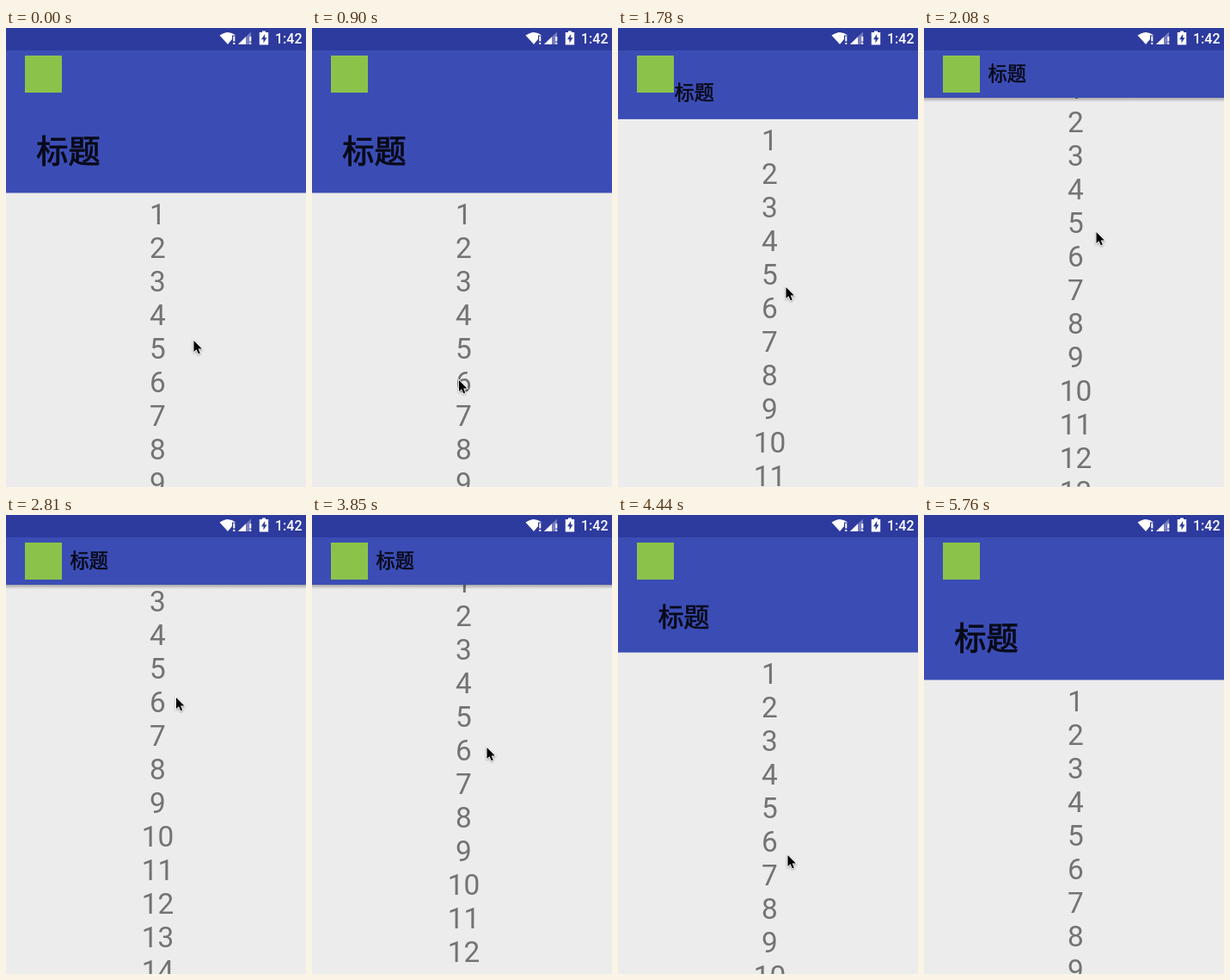
Write an HTML page that moves like this. It is 349x533 px and loops after 6.06 s.

```html
<!DOCTYPE html>
<html lang="zh">
<head>
<meta charset="utf-8">
<style>
  html, body { margin: 0; width: 100%; height: 100%; overflow: hidden; background: #ececec; }
  svg { display: block; }
  #list { font: 33.4px Roboto, sans-serif; fill: #737373; text-anchor: middle; }
  #title {
    font-family: "Noto Sans CJK SC", "Noto Sans CJK", sans-serif;
    fill: #080a18; stroke: #080a18; stroke-width: .025em;
  }
  #clock { font: 500 16px Roboto, sans-serif; fill: #fff; }
  #cursor { filter: drop-shadow(0 1px 1px rgba(0, 0, 0, .35)); }
</style>
</head>
<body>
<svg width="349" height="533" viewBox="0 0 349 533">
  <defs>
    <linearGradient id="fade" x2="0" y2="1">
      <stop offset="0" stop-color="#000" stop-opacity=".3"/>
      <stop offset="1" stop-color="#000" stop-opacity="0"/>
    </linearGradient>
  </defs>
  <rect width="349" height="533" fill="#ececec"/>
  <g id="list"></g>
  <rect id="shadow" y="81" width="349" height="5" fill="url(#fade)"/>
  <rect id="header" width="349" fill="#3b4db5"/>
  <rect width="349" height="26" fill="#2d3a9e"/>
  <rect x="22" y="32" width="43" height="43" fill="#8bc34a"/>

  <!-- status bar: wifi, signal, battery, clock -->
  <g fill="#fff">
    <path d="M248.5 8.5Q258 1.5 267.5 8.5H263V13L258 19Z"/>
    <path d="M264.3 9.5h2v6h-2zM264.3 17h2v2h-2z"/>
    <path d="M285 4.5V19H270Z" opacity=".35"/>
    <path d="M279 10.3V19H270Z"/>
    <path d="M283.3 10h2v5.5h-2zM283.3 17h2v2h-2z"/>
    <path d="M298 3.5h4V5h3.2v14.5h-10.4V5H298Z"/>
    <path d="M301.2 7l-4.2 6.2h2.5V17.5l4-6.3h-2.3Z" fill="#2d3a9e"/>
  </g>
  <text id="clock" x="313" y="18">1:42</text>

  <text id="title">标题</text>
  <path id="cursor" d="M0 0V13L3 10.2L5.2 15.3L7.3 14.4L5.2 9.5H9.4Z"
        stroke="#fff" stroke-width="1.6" paint-order="stroke"/>
</svg>
<script>
const LOOP = 6060, TICK = 147.7;  // the picture advances once per tick
const RANGE = 111;                // scroll needed to collapse the header

// Key points: [tick, value...], straight lines between them
const scrollKeys = [[8.9, 0], [10, 26], [14, 146], [15.6, 194], [23.9, 194], [30, 32], [31, 0]];
const pointerKeys = [
  [3, 218.5, 363], [6, 171, 409], [7, 187, 397], [8, 187, 397],  // approach
  [10, 190.5, 365], [14, 200.5, 237], [15, 198, 212],            // drag up
  [20, 198, 212], [22, 203, 184], [23, 203, 184],                // rest
  [26, 203.5, 270], [30, 197.5, 395], [31, 196, 414],            // drag down
  [36, 196, 417], [39, 300, 560]                                 // leave
];

const el = id => document.getElementById(id);
const mix = (a, b, p) => a + (b - a) * p;
const set = (id, attrs) => {
  for (const key in attrs) el(id).setAttribute(key, attrs[key]);
};

function track(keys, tick) {
  const from = keys.findLast(key => key[0] <= tick) ?? keys[0];
  const to = keys.find(key => key[0] > tick) ?? from;
  const p = from === to ? 0 : (tick - from[0]) / (to[0] - from[0]);
  return from.slice(1).map((value, i) => mix(value, to[i + 1], p));
}

for (let n = 1; n <= 16; n++)
  el("list").innerHTML += `<text x="176.5" y="${189 + 39 * n}">${n}</text>`;

function draw(now) {
  const tick = Math.floor((now % LOOP + 3) / TICK);
  const [scroll] = track(scrollKeys, tick);
  const [x, y] = track(pointerKeys, tick);
  const p = Math.min(1, scroll / RANGE);
  const ease = 1 - (1 - p) ** 2;

  set("list", { transform: `translate(0 ${-scroll})` });
  set("header", { height: mix(191.5, 81, p) });
  set("shadow", { opacity: p < 1 ? 0 : 1 });
  set("title", { x: mix(35.3, 74.6, p), y: mix(157.2, 60.9, p), "font-size": mix(37.2, 22.2, ease) });
  set("cursor", { transform: `translate(${x} ${y})` });
  requestAnimationFrame(draw);
}
draw(0);
</script>
</body>
</html>
```
